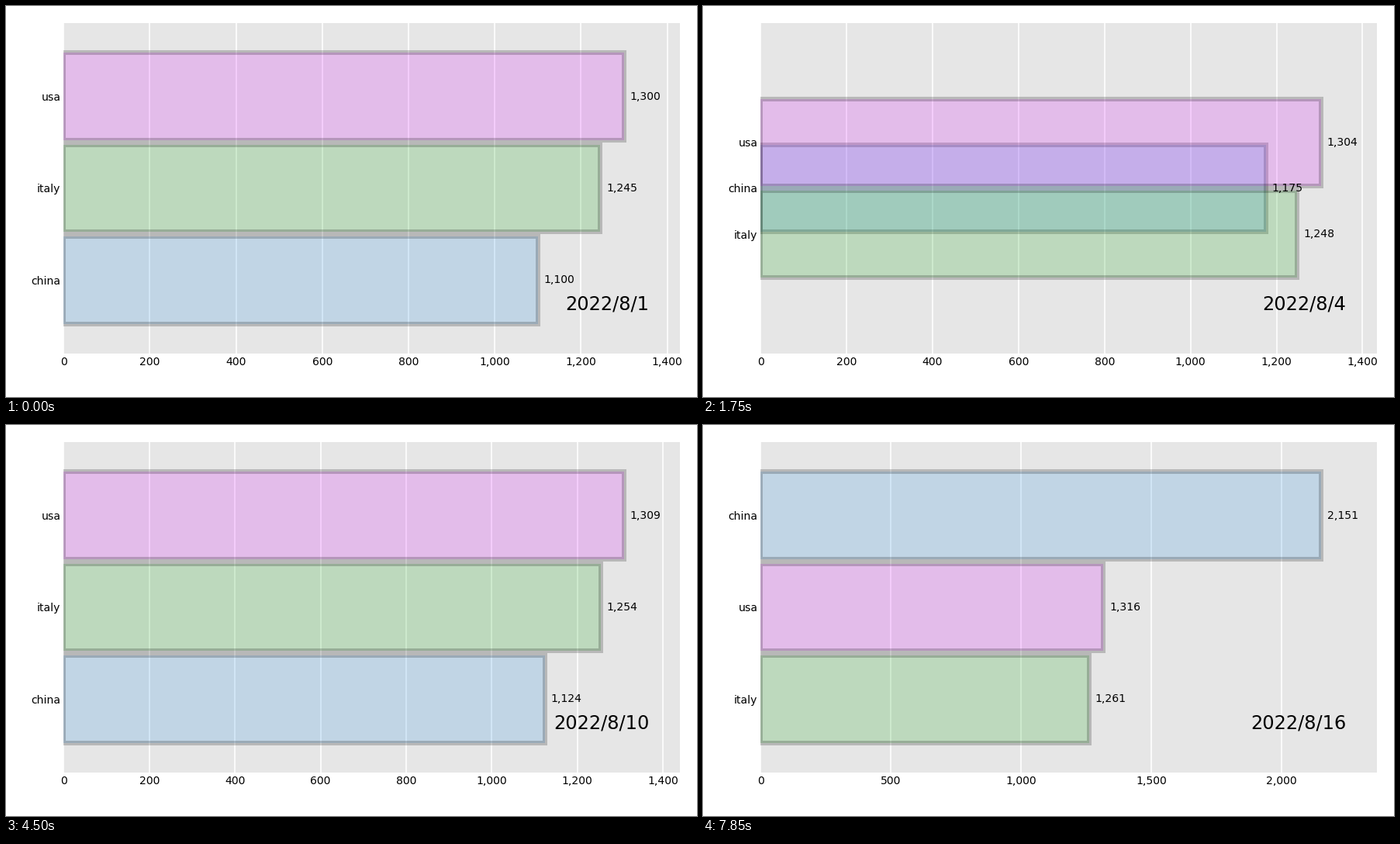
A matplotlib script for the animation above (8 s loop, 891 by 504 pixels).

```python
import numpy as np
import matplotlib.pyplot as plt
from matplotlib.animation import FuncAnimation
from matplotlib.ticker import StrMethodFormatter

W, H, DPI = 891, 504, 144
STEPS, FRAMES = 10, 160
BAR = 0.95

days = np.arange(17)
names = ["china", "italy", "usa"]
colors = ["#2E91E5", "#1CA71C", "#DA16FF"]
china = [1100, 1200, 1300, 900, 1450, 1400, 1540, 1565, 1538, 1124,
         1234, 2222, 2144, 2145, 2149, 2150, 2151]
values = np.array([china, 1245 + days, 1300 + days], float)
ranks = values.argsort(axis=0).argsort(axis=0) + 1.0

plt.rcParams["font.family"] = "DejaVu Sans"
fig = plt.figure(figsize=(W / DPI, H / DPI), dpi=DPI, facecolor="white")
left, right, top, bottom = 74.3, 869.2, 22, 448
ax = fig.add_axes([left / W, 1 - bottom / H, (right - left) / W, (bottom - top) / H])
ax.set_facecolor("0.9")
ax.set_axisbelow(True)
ax.grid(True, axis="x", color="white")
ax.tick_params(labelsize=7, length=0, pad=2)
ax.xaxis.set_major_formatter(StrMethodFormatter("{x:,.0f}"))
for spine in ax.spines.values():
    spine.set_visible(False)

bars = ax.barh(ranks[:, 0], values[:, 0], height=BAR, color=colors,
               alpha=0.2, ec="black", lw=3)
labels = [ax.text(0, 0, "", size=7, ha="left", va="center") for _ in names]
date = ax.text(0.95, 0.15, "", size=12, ha="right", va="center",
               transform=ax.transAxes)
ax.set_ylim(0.2, len(names) + 0.8)


def at(rows, i):
    """Linear blend between two neighbouring days."""
    day, step = divmod(i, STEPS)
    a, b = rows[:, day], rows[:, day + 1]
    return a + (b - a) * step / STEPS


def update(i):
    vals, pos = at(values, i), at(ranks, i)
    xmax = vals.max() * 1.1
    ax.set_xlim(0, xmax)
    ax.set_yticks(pos, names)
    for bar, label, v, y in zip(bars, labels, vals, pos):
        bar.set_width(v)
        bar.set_y(y - BAR / 2)
        label.set_position((v + 0.01 * xmax, y))
        label.set_text(f"{v:,.0f}")
    date.set_text(f"2022/8/{i // STEPS + 1}")
    return [*bars, *labels, date]


anim = FuncAnimation(fig, update, frames=FRAMES, interval=50,
                     repeat=True, repeat_delay=0, blit=False)
plt.show()
```
